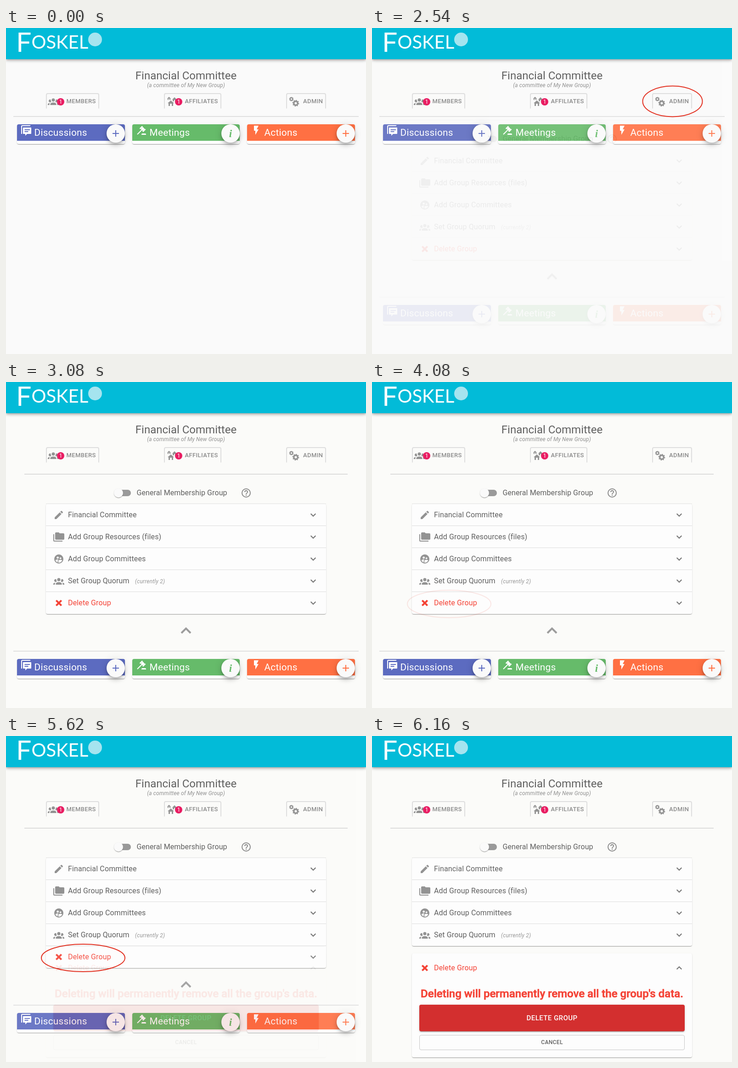
An HTML page for the animation above (8 s loop, 784 px wide and 711 px high).

```html
<!DOCTYPE html>
<html lang="en">
<head>
<meta charset="utf-8">
<title>Committee administration</title>
<style>
html, body { margin: 0; width: 100%; height: 100%; overflow: hidden; background: #fafafa; }
.layer, .layer svg { position: absolute; left: 0; top: 0; width: 784px; height: 711px; overflow: hidden; }
.box { position: absolute; box-sizing: border-box; }
text { font-family: Roboto, sans-serif; white-space: pre; }
.low { box-shadow: 0 2px 1px -1px #0003, 0 1px 1px #00000024, 0 1px 3px #0000001f; }
.mid { box-shadow: 0 3px 1px -2px #0003, 0 2px 2px #00000024, 0 1px 5px #0000001f; }
.bar { box-shadow: 0 2px 4px -1px #0003, 0 4px 5px #00000024, 0 1px 10px #0000001f; }
.fab { box-shadow: 0 3px 5px -1px #0003, 0 6px 10px #00000024, 0 1px 18px #0000001f; border-radius: 50%; }
</style>
</head>
<body>
<script>
const GREY = '#939393', INK = '#606060', RED = '#f44336', PAGE = '#fbfbf9';

const box = (x, y, w, h, fill, cls = '', css = '') =>
  `<div class="box ${cls}" style="left:${x}px;top:${y}px;width:${w}px;height:${h}px;background:${fill};${css}"></div>`;
const text = (x, y, str, size, fill, attrs = '') =>
  `<text x="${x}" y="${y}" font-size="${size}" fill="${fill}" ${attrs}>${str}</text>`;
const spaced = n => `letter-spacing="${n}"`;
const centred = 'text-anchor="middle"';
const at = (x, y, body, fill) => `<g transform="translate(${x} ${y})" fill="${fill}">${body}</g>`;
const path = (d, attrs = '') => `<path d="${d}" ${attrs}/>`;
const line = (d, color, width) => path(d, `fill="none" stroke="${color}" stroke-width="${width}"`);
const circle = (x, y, r, attrs = '') => `<circle cx="${x}" cy="${y}" r="${r}" ${attrs}/>`;
const ring = (x, y, rx, ry) =>
  `<ellipse cx="${x}" cy="${y}" rx="${rx}" ry="${ry}" fill="none" stroke="#e01f0e" stroke-width="2"/>`;

function layer(boxes, shapes, background = 'none') {
  const el = document.createElement('div');
  el.className = 'layer';
  el.style.background = background;
  el.innerHTML = boxes + `<svg viewBox="0 0 784 711">${shapes}</svg>`;
  document.body.append(el);
  return el;
}

// Icons on a 24 px grid
const icons = {
  people: circle(12, 9, 3.5) +
    path('M6.5 8.4A3 3 0 1 0 7.7 12.4A5.5 5.5 0 0 1 6.5 8.4M17.5 8.4A3 3 0 1 1 16.3 12.4A5.5 5.5 0 0 0 17.5 8.4') +
    path('M5.5 20V18.25C5.5 13.3 18.5 13.3 18.5 18.25V20ZM0 20V18.5Q.3 16.2 4.45 15.6Q3.5 16.8 3.5 18.25V20ZM24 20V18.5Q23.7 16.2 19.55 15.6Q20.5 16.8 20.5 18.25V20Z'),
  houses: path('M17 16H15V22H12V17H8V22H5V16H3L10 10ZM6 2L10 6H9V9H7V6H5V9H3V6H2ZM18 3L23 8H22V12H19V9H17V12H15.3L14 10.9V8H13Z'),
  pencil: path('M3 17.25V21h3.75L17.81 9.94l-3.75-3.75ZM20.7 7q.6-.7 0-1.4l-2.3-2.3q-.7-.6-1.4 0l-1.9 1.8 3.75 3.75Z'),
  folders: path('M22 4H14L12 2H6A2 2 0 0 0 4 4V16A2 2 0 0 0 6 18H22A2 2 0 0 0 24 16V6A2 2 0 0 0 22 4M2 6H0V20A2 2 0 0 0 2 22H20V20H2Z'),
  team: circle(12, 12, 10) +
    `<g fill="#fdfdfd">${circle(9.6, 9.1, 2.4)}${circle(15.6, 10.3, 1.9)}` +
    path('M4.5 14.7C5.5 13.5 8 13 9.6 13q1 0 1.9.2C9.9 14.1 9.6 15.2 9.6 15.9V19.6Q6 18.4 4.5 14.7M11.2 20V15.9C11.2 13.3 17 13 19.4 14.9Q17 20.3 11.2 20') + '</g>',
  help: circle(12, 12, 9, 'fill="none" stroke="#8c8c8c" stroke-width="2"') +
    path('M11 16h2v2h-2zM12 6a4 4 0 0 0-4 4h2a2 2 0 1 1 4 0c0 2-3 1.75-3 5h2c0-2.25 3-2.5 3-5a4 4 0 0 0-4-4'),
  cross: line('M6.3 6.3L17.7 17.7M17.7 6.3L6.3 17.7', RED, 4),
  down: line('M6.7 9.3L12 14.6L17.3 9.3', '#757575', 2.1),
  up: line('M6.7 14.7L12 9.4L17.3 14.7', '#757575', 2.1),
  plus: path('M19 13h-6v6h-2v-6H5v-2h6V5h2v6h6z'),
  bolt: path('M7 2v11h3v9l7-12h-4l4-8z'),
  gavel: line('M3 21L13 11', '#fff', 2) + path('M10.5 9.3L15 4.8L19 9.3L14.7 13.5ZM12 22v-1q0-2 2-2h6q2 0 2 2v1z') +
    line('M8.6 8.9L14.2 3.3M14.9 15.2L20.5 9.6', '#fff', 2.6),
  chat: line('M2 20V3.5Q2 2 3.5 2H21', '#fff', 2) + path('M6 6h16q1 0 1 1v12q0 1-1 1h-8l-4 4v-4h-4q-1 0-1-1V7q0-1 1-1z') +
    line('M8.5 11h11.500M8.5 15h8', '#5c6bc0', 2),
};

const gear = (x, y, r) => circle(x, y, r * .58, `fill="none" stroke="${GREY}" stroke-width="${r * .46}"`) +
  circle(x, y, r * .87, `fill="none" stroke="${GREY}" stroke-width="${r * .28}" pathLength="16" stroke-dasharray="1"`);
const badge = x => circle(x, 161, 8, 'fill="#e91e63"') + text(x, 165, 1, 12, '#fff', centred);
const tab = (x, w, label, labelX) =>
  line(`M${x + 1} 175.500V146q0-3 3-3H${x + w - 4}q3 0 3 3V175.500`, '#dedede', 2) +
  text(labelX, 164, label, 13, '#8a8a8a', 'font-weight="500" ' + spaced(.37));

const cards = [
  { x: 24, w: 235, label: 'Discussions', color: '#5c6bc0', icon: 'chat', iconY: 211 },
  { x: 275, w: 234, label: 'Meetings', color: '#66bb6a', icon: 'gavel', iconY: 211 },
  { x: 525, w: 235, label: 'Actions', color: '#ff7043', icon: 'bolt', iconY: 211 },
];
const cardBoxes = dy => box(16, 192 + dy, 752, 2, '#e0e0e0') + cards.map(c =>
  box(c.x, 210 + dy, c.w, 43, '#fff', 'low', 'border-radius:4px') +
  box(c.x, 210 + dy, c.w, 36, c.color, '', 'border-radius:4px 4px 0 0') +
  box(c.x + c.w - 40, 210 + dy, 40, 40, '#fafafa', 'fab')).join('');
const cardShapes = dy => cards.map(c => {
  const mid = c.x + c.w - 20;
  return at(c.x + 8, c.iconY + dy, icons[c.icon], '#fff') +
    text(c.x + 37.5, 235 + dy, c.label, 20.8, '#fff', spaced(.26)) +
    (c.icon === 'gavel'
      ? text(mid, 238 + dy, 'i', 23, c.color, centred + ' font-weight="700" font-style="italic" style="font-family:\'Liberation Serif\',serif"')
      : at(mid - 12, 218 + dy, icons.plus, c.color));
}).join('');

const rows = [
  ['pencil', 'Financial Committee'],
  ['folders', 'Add Group Resources (files)'],
  ['team', 'Add Group Committees'],
  ['people', 'Set Group Quorum'],
];
const panel = (y, h) => box(87, y, 610, h, '#fdfdfd', 'low', 'border-radius:4px');
const rowLines = n => Array.from({ length: n }, (_, i) => box(87, 313 + 48 * i, 610, 1, '#dcdcdc')).join('');
const row = (y, icon, label, color, arrow = 'down') =>
  at(103, y - 12, icons[icon], GREY) + text(135, y + 5, label, 16, color, spaced(.14)) +
  at(657, y - 12, icons[arrow], 'none');

const settingBoxes = box(40, 200, 704, 2, '#dcdcdc') +
  box(237, 235, 35, 14, '#9a9a9a', '', 'border-radius:7px') +
  box(235, 232, 20, 20, '#fafafa', 'low', 'border-radius:50%');
const settingShapes = text(284.5, 247, 'General Membership Group', 16, INK, spaced(.1)) +
  at(511, 230, icons.help, '#8c8c8c') +
  rows.map(([icon, label], i) => row(290 + 48 * i, icon, label, INK)).join('') +
  text(281, 439, '(currently 2)', 12, '#979797', 'font-style="italic" ' + spaced(.2));

layer(cardBoxes(0), cardShapes(0), '#fafafa');

const adminRing = layer('', ring(654.5, 160, 65, 33.5));

const settings = layer(
  settingBoxes + panel(266, 240) + box(87, 265, 610, 1, '#e2e2e2') + rowLines(4) + cardBoxes(394),
  settingShapes + row(482, 'cross', 'Delete Group', RED) +
  line('M382 547.500L392 537.500L402 547.500', '#9c9c9c', 4) + cardShapes(394), PAGE);

const deleteRing = layer('', ring(168, 484, 91, 30));

const confirmation = layer(
  settingBoxes + panel(266, 192) + box(87, 265, 610, 1, '#e2e2e2') + rowLines(3) + panel(474, 227) +
  box(103, 586, 578, 58, '#d32f2f', 'mid', 'border-radius:4px') +
  box(103, 652, 578, 33, 'none', '', 'border:1px solid #c6c6c6;border-radius:4px'),
  settingShapes + row(506, 'cross', 'Delete Group', RED, 'up') +
  text(392, 570, "Deleting will permanently remove all the group's data.", 24, RED,
    `${centred} font-weight="500" stroke="${RED}" stroke-width=".7"`) +
  text(392, 620, 'DELETE GROUP', 15, '#fff', `${centred} font-weight="500" ${spaced(.43)}`) +
  text(392, 672, 'CANCEL', 12, INK, `${centred} font-weight="500" ${spaced(.35)}`), PAGE);

// Header and group title stay in place throughout
layer(box(0, 0, 784, 68, '#02bbd8', 'bar'),
  `<text x="22" y="52" font-size="59" fill="#fff" style="font-family:Lato,sans-serif">F<tspan y="45" font-size="40">OSKEL</tspan></text>` +
  circle(194, 25, 15, 'fill="#a5e4ef"') +
  text(392, 112, 'Financial Committee', 24, INK, centred) +
  text(392, 129, '(a committee of My New Group)', 12, '#919191', `${centred} font-style="italic" ${spaced(.13)}`) +
  tab(87, 116, 'MEMBERS', 131.5) + at(91, 148, icons.people, GREY) + badge(119) +
  tab(344, 125, 'AFFILIATES', 389.5) + at(349, 148, icons.houses, GREY) + badge(376) +
  tab(610, 87, 'ADMIN', 647) + gear(621.5, 155, 4.8) + gear(631, 164, 7.3));

const LOOP = 8000, STEP = 60, STEPS = 10;
function fadeIn(el, start) {
  const frames = [{ opacity: 0, offset: 0, easing: 'step-end' }];
  for (let k = 0; k < STEPS; k++)
    frames.push({ opacity: (k + 1) / STEPS, offset: (start + k * STEP) / LOOP, easing: 'step-end' });
  frames.push({ opacity: 1, offset: 1 });
  el.animate(frames, { duration: LOOP, iterations: Infinity });
}
fadeIn(adminRing, 1000);
fadeIn(settings, 2540);
fadeIn(deleteRing, 4080);
fadeIn(confirmation, 5620);
</script>
</body>
</html>
```
